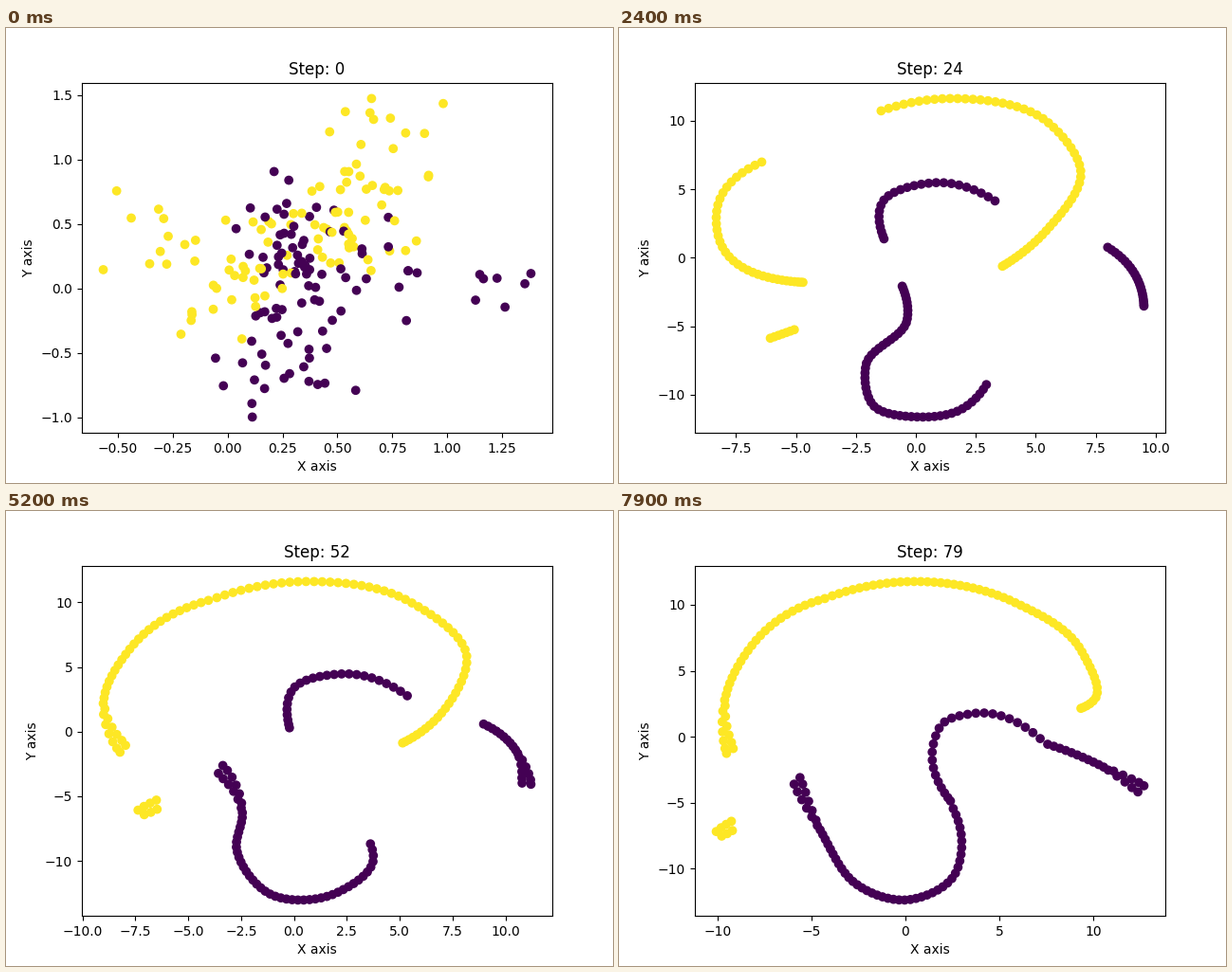
Write a matplotlib script that moves like this. It is 640 px wide and 480 px high and loops after 8000 ms.

```python
import numpy as np
import matplotlib.pyplot as plt
from matplotlib.animation import FuncAnimation

STEPS = 80
KEYS = (8, 24, 52, 79)
ASPECT = np.array([1.6, 1.0])
PURPLE, YELLOW = 0, 1
rng = np.random.default_rng(7)


def spread(knots, n, skew):
    """Place n points along a smooth curve; skew > 0 crowds its end, < 0 its start."""
    p = np.array(knots, float)
    chord = np.hypot(*(np.diff(p, axis=0) * ASPECT).T)
    t = np.r_[0, np.cumsum(chord)]
    slope = np.gradient(p, t, axis=0, edge_order=min(2, len(p) - 1))
    q = np.linspace(0, t[-1], 600)
    k = np.clip(np.searchsorted(t, q, side="right") - 1, 0, len(p) - 2)
    h = (t[k + 1] - t[k])[:, None]
    u = (q - t[k])[:, None] / h
    curve = ((1 + 2 * u) * (1 - u) ** 2 * p[k] + u * (1 - u) ** 2 * h * slope[k]
             + u * u * (3 - 2 * u) * p[k + 1] + u * u * (u - 1) * h * slope[k + 1])
    run = np.r_[0, np.cumsum(np.hypot(*(np.diff(curve, axis=0) * ASPECT).T))]
    w = np.linspace(0, 1, n)
    w = 1 - (1 - w) ** (1 + skew) if skew > 0 else w ** (1 - skew)
    return np.column_stack([np.interp(w * run[-1], run, c) for c in curve.T])


def zigzag(points, tail):
    """Alternate sideways shift near the end (tail > 0) or the start (tail < 0)."""
    if not tail:
        return np.zeros_like(points)
    d = np.gradient(points, axis=0) * ASPECT
    normal = np.column_stack([-d[:, 1], d[:, 0]]) / np.hypot(*d.T)[:, None]
    i = np.arange(len(points))
    dist = i[::-1] if tail > 0 else i
    weight = np.clip(1.3 * (1 - dist / abs(tail)), 0, 1) * (-1.0) ** i
    return normal / ASPECT * weight[:, None] * 0.33


class Strand:
    """A run of dots with one shape per key step; early and late set its pace."""

    def __init__(self, color, n, skew, tail, *shapes, early=1, late=1.25):
        self.color, self.n = color, n
        self.poses = [spread(s, n, skew) for s in shapes]
        self.zigs = [zigzag(p, tail) for p in self.poses]
        self.early = np.linspace(early, 1, n)
        self.late = np.linspace(late, 1.25, n)


upper = Strand(
    YELLOW, 57, 0.2, 0,
    [(.64, 9.37), (4.3, 9.54), (5.55, 8.3), (4.55, 6.57), (3.25, 5.14), (3.6, 3.6),
     (4.5, 1.9), (3.63, .23)],
    [(-1.45, 10.73), (1.58, 11.63), (5.45, 9.97), (6.88, 6.23), (5.49, 2.08), (3.61, -.62)],
    [(-3.64, 10.36), (.73, 11.61), (5.36, 10.15), (8.17, 5.84), (6.92, 1.31), (5.14, -.88)],
    [(-3.89, 10.68), (.39, 11.76), (5.82, 10.18), (9.4, 6.45), (10.1, 2.87), (9.35, 2.15)],
    early=4)
left = Strand(
    YELLOW, 36, 0.3, 13,
    [(-5.83, 4.8), (-6.85, 3.5), (-7.15, 2.06), (-5.73, -.11), (-2.37, -1.31)],
    [(-6.43, 6.99), (-8.22, 4.08), (-8.14, 1.04), (-4.71, -1.8)],
    [(-4.04, 10.15), (-7.74, 6.42), (-8.99, 2.04), (-8.06, -1.39)],
    [(-4.29, 10.47), (-8.07, 7.1), (-9.63, 2.51), (-9.33, -1.15)],
    early=4)
island = Strand(
    YELLOW, 7, 0, 14,
    [(-5.52, -4.5), (-4.87, -4.5)],
    [(-6.07, -5.88), (-5.07, -5.26)],
    [(-7.3, -6.3), (-6.41, -5.6)],
    [(-10, -7.4), (-9.17, -6.7)])
hook = Strand(
    PURPLE, 54, -0.15, -12,
    [(1.02, -1.37), (1.84, -2.86), (1.16, -4.1), (-.73, -5.2), (-2.4, -7.9),
     (-1.72, -9.2), (.5, -9.1), (1.75, -7.9), (1.53, -7.15)],
    [(-.57, -2.08), (-.37, -4.57), (-2.08, -7.82), (-1.73, -10.87), (.03, -11.63),
     (1.9, -11.07), (2.94, -9.27)],
    [(-3.51, -2.85), (-2.44, -6.2), (-2.71, -9.05), (-1.23, -12.48), (2.02, -12.48),
     (3.76, -9.78), (3.62, -8.69)],
    [(-5.8, -3.23), (-4.44, -7.31), (-2.73, -11.04), (.29, -12.33), (2.7, -10.25),
     (3, -8.39), (2.55, -5.45)])
arch = Strand(
    PURPLE, 25, -0.2, 0,
    [(-1.45, 1.14), (-1.9, 2.6), (-2.05, 4.7), (-1.14, 5.4), (.2, 4.9), (.99, 3.09)],
    [(-1.33, 1.38), (-1.41, 4.01), (.71, 5.47), (3.3, 4.15)],
    [(-.21, .29), (-.08, 3.21), (2.15, 4.45), (5.36, 2.77)],
    [(2.4, -4.87), (1.49, -.57), (1.9, .86), (3.5, 1.74), (7.18, -.14)])
right = Strand(
    PURPLE, 21, 0.25, 10,
    [(6.65, .25), (7.43, -.57), (8.25, -3.09)],
    [(8, .76), (9.19, -1.38), (9.51, -3.53)],
    [(8.97, .58), (10.58, -1.68), (11, -4.1)],
    [(7.58, -.57), (10.45, -2.22), (12.6, -4)],
    late=3)
strands = [hook, upper, left, island, arch, right]

labels = np.concatenate([[s.color] * s.n for s in strands])
early = np.concatenate([s.early for s in strands])[:, None]
late = np.concatenate([s.late for s in strands])[:, None]
poses = [np.vstack([s.poses[k] for s in strands]) for k in range(len(KEYS))]
zigs = [np.vstack([s.zigs[k] for s in strands]) for k in range(len(KEYS))]
total = len(labels)

jitter = rng.normal(0, 1, (total, 2)) * (.06, .1)
jitter[0] = -2.4, -1.9  # one dot starts away from its strand
order = rng.permutation(total)


def first_scatter():
    """The strands shrunk unevenly into one noisy cloud with fixed bounds."""
    pull = rng.uniform(.1, 1.1, (total, 1))
    p = poses[0] * (.11, .1) * pull + rng.normal(0, 1, (total, 2)) * (.07, .12)
    low, high = p.min(axis=0), p.max(axis=0)
    box = np.array([(-.566, -.996), (1.381, 1.473)])
    return box[0] + (p - low) / (high - low) * (box[1] - box[0])


start = first_scatter()


def layout(step):
    if step < KEYS[0]:
        u = 1 - (1 - step / KEYS[0]) ** 1.6
        return start + (poses[0] + jitter - start) * u
    k = min(np.searchsorted(KEYS, step, side="right") - 1, len(KEYS) - 2)
    u = (step - KEYS[k]) / (KEYS[k + 1] - KEYS[k])
    u = (1 - (1 - u) ** 1.5, 1 - (1 - u) ** early, u ** late)[k]
    mix = lambda a: a[k] + (a[k + 1] - a[k]) * u
    ramp = np.clip((step - 36) / 14, 0, 1)
    fade = np.clip((18 - step) / 10, 0, 1)
    return mix(poses) + ramp * mix(zigs) + fade * jitter


fig, ax = plt.subplots(figsize=(6.4, 4.8), dpi=100)
dots = ax.scatter(*start[order].T, c=labels[order], cmap="viridis")
ax.set_xlabel("X axis")
ax.set_ylabel("Y axis")
title = ax.set_title("Step: 0")


def update(step):
    pts = layout(step)
    dots.set_offsets(pts[order])
    lo, hi = pts.min(axis=0), pts.max(axis=0)
    pad = 0.05 * (hi - lo)
    ax.set_xlim(lo[0] - pad[0], hi[0] + pad[0])
    ax.set_ylim(lo[1] - pad[1], hi[1] + pad[1])
    title.set_text(f"Step: {step}")
    return dots, title


anim = FuncAnimation(fig, update, frames=STEPS, interval=100, repeat=True, repeat_delay=0)
plt.show()
```
